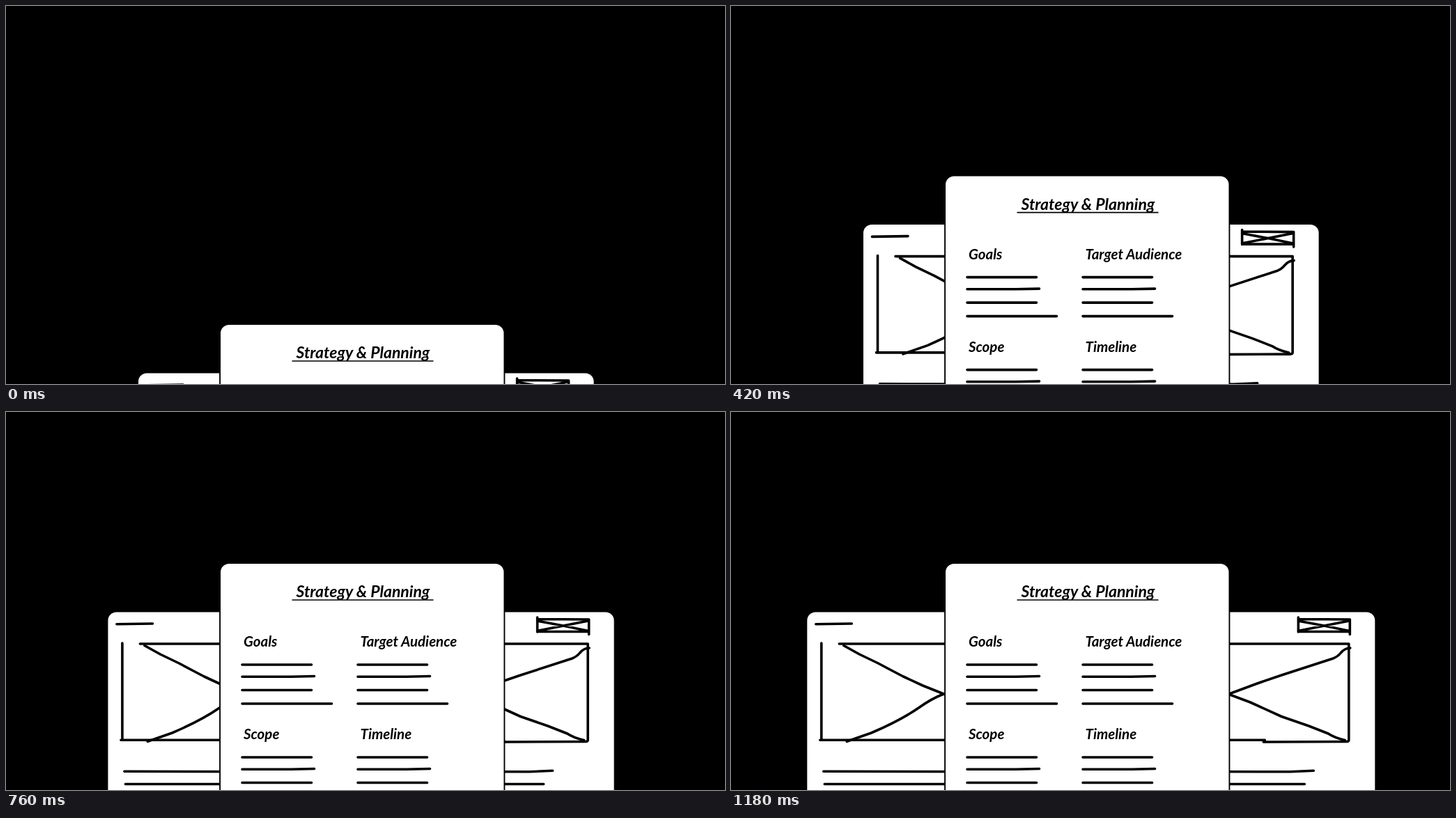
An HTML page for the animation above (1.4 s loop, 1032x543 px).

```html
<!DOCTYPE html>
<html lang="en">
<head>
<meta charset="utf-8">
<title>Strategy and planning</title>
<style>
  html, body { margin: 0; height: 100%; overflow: hidden; background: #000; }
  svg { display: block; width: 1032px; height: 543px; }
  path { fill: none; stroke: #000; stroke-width: 3.6; stroke-linecap: round; stroke-linejoin: round; }
  text { font: italic bold 20.5px Lato, "Open Sans", sans-serif; }
  .title { font-size: 23px; text-anchor: middle; }
  .underline { stroke-width: 1.6; stroke-linecap: butt; }
</style>
</head>
<body>
<svg viewBox="0 0 1032 543">
  <defs>
    <g id="wireframe">
      <rect y="287.5" width="407" height="500" rx="12" fill="#fff"/>
      <path d="M12.5 304.8L64 304"/>
      <path d="M297 295V316M297 297.5L371 298V319.5M297 315.5H371M299 300.5L334 307L370 314.5M299 314L370 300"/>
      <path d="M20.5 332V470M46 333H369.5V471Q369.5 473.5 366 473.5L247 474M18.5 471.3H249"/>
      <path d="M52.500 335.500L75 348L102 361L117 369L138 380L166 393L196 405
               L199 404.500L238 390L273 378L347 354Q354 351 358 346Q364 339 371.500 339"/>
      <path d="M57 473.300L92 461Q134 443 160 425Q178 412 196 405
               L228 417L273 437.500L312 451L340 462Q349 468 364 471.500"/>
      <path d="M23.500 516.300L285 516.800L319 515.300M25 534.500H306"/>
    </g>
    <path id="lines" d="M0 0H99.500M0 17.200L70 17.200L103.500 16.500M0 36.500H99.500M0 56H128.500"/>
  </defs>
  <g id="scene">
    <use id="left" href="#wireframe"/>
    <use id="right" href="#wireframe"/>
    <rect x="307.100" y="217" width="408.300" height="600" rx="13" fill="#fff" stroke="#000" stroke-width="1.900"/>
    <text class="title" x="512.500" y="266">Strategy &amp; Planning</text>
    <path class="underline" d="M410.500 270H613.500"/>
    <text x="341" y="337">Goals</text>
    <text x="508.500" y="337">Target Audience</text>
    <text x="341" y="470">Scope</text>
    <text x="508.500" y="470">Timeline</text>
    <use href="#lines" x="339" y="363"/>
    <use href="#lines" x="505" y="363"/>
    <use href="#lines" x="339" y="496"/>
    <use href="#lines" x="505" y="496"/>
  </g>
</svg>
<script>
const LOOP = 1400, HOLD = 1180;
const [scene, left, right] = ["scene", "left", "right"].map(id => document.getElementById(id));

// Cubic-bezier easing with control points (a, 0) and (b, 1)
function ease(p, a, b) {
  if (p <= 0) return 0;
  if (p >= 1) return 1;
  let lo = 0, hi = 1, u;
  for (let i = 0; i < 30; i++) {
    u = (lo + hi) / 2;
    const v = 1 - u;
    if (3 * a * u * v * v + 3 * b * u * u * v + u * u * u < p) lo = u; else hi = u;
  }
  return u * u * (3 - 2 * u);
}

// Smooth curve through [time, value, slope] keys
function spline(keys, t) {
  if (t <= keys[0][0]) return 0;
  const i = keys.findIndex(k => k[0] >= t);
  if (i < 0) return 1;
  const [t0, y0, m0] = keys[i - 1], [t1, y1, m1] = keys[i];
  const h = t1 - t0, s = (t - t0) / h, q = 1 - s;
  return y0 * q * q * (1 + 2 * s) + m0 * h * s * q * q
       + y1 * s * s * (3 - 2 * s) - m1 * h * s * s * q;
}

const slide = [[440, 0, 0], [540, .043, .001], [760, .358, .0021], [1020, .943, .0009], [1200, 1, 0]];
const shift = (el, x, y) => el.setAttribute("transform", `translate(${x} ${y})`);

function draw() {
  const t = Math.min(performance.now() % LOOP, HOLD);
  shift(scene, 0, 240 * (1 - ease(t / 600, .65, .35)));
  shift(left, 190 - 80.7 * ease((t - 440) / 640, .47, .48), 0);
  shift(right, 436.6 + 80.7 * spline(slide, t), 0);
  requestAnimationFrame(draw);
}
draw();
</script>
</body>
</html>
```
